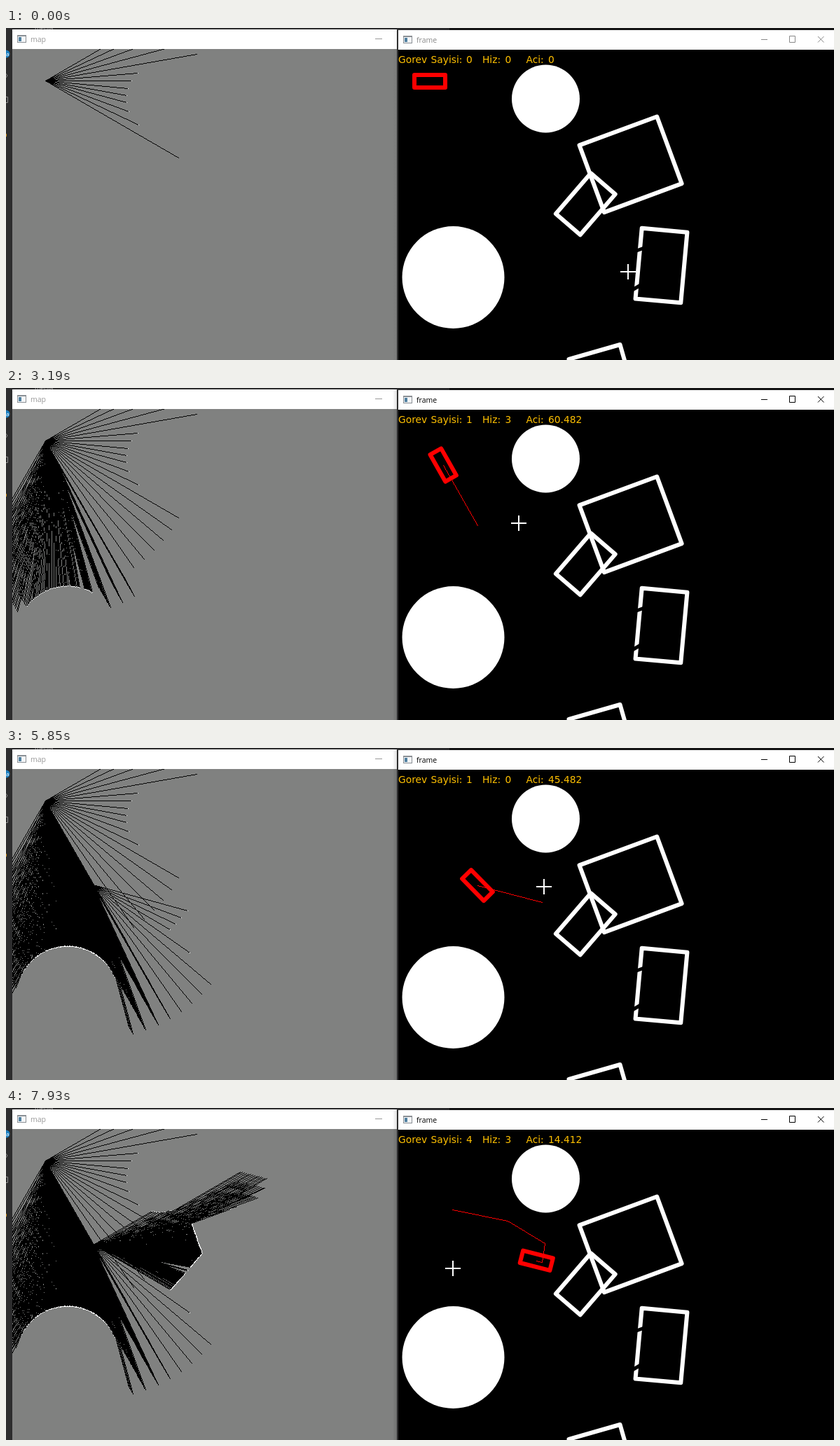
An HTML page with a canvas that plays this animation: 1182x474 px, repeating every 8000 ms.

```html
<!DOCTYPE html>
<html lang="en">
<head>
<meta charset="utf-8">
<title>Lidar mapping</title>
<style>
html, body { margin: 0; width: 100%; height: 100%; overflow: hidden; background: #2d2d2e; }
canvas { display: block; width: 1182px; height: 474px; }
</style>
</head>
<body>
<canvas id="stage" width="1182" height="474"></canvas>
<script>
const ctx = document.getElementById('stage').getContext('2d');
const LOOP = 8000, RANGE = 220, RAD = Math.PI / 180;
const MAP = { x: 9, y: 30, w: 549, h: 444 };
const VIEW = { x: 560, y: 31, w: 622, h: 443 };

// obstacles in the "frame" window
const circles = [[770.5, 101, 48.5], [638.5, 356, 73]];
const boxes = [
  box(891.6, 194.8, 118, 102, -20.3),
  box(827.3, 251.3, 46, 76.5, 40.8),
  box(935.5, 339.1, 65, 101, 5.2),
  box(850.5, 499, 76, 76, -16)
];
const walls = boxes.flatMap(b => b.map((p, i) => [...p, ...b[(i + 1) % 4]]));

// robot: turn to the first goal, drive, turn to the second, drive
const START = [605, 76], SENSOR = [1.6, 0.4];
const TURN = 3, SPEED = 3, HEAD_A = 60.482, HEAD_B = 14.412;
const TURNS_A = 21, MOVES_A = 46, TURNS_B = 16;
const STOP_A = TURNS_A + MOVES_A, GO_B = STOP_A + TURNS_B;
const REACHED_AT = 5200;

// clicks: time, x, y
const goals = [[930, 673, 196], [5420, 765, 220], [5950, 769, 193],
  [7080, 716, 161], [7785, 637, 145]];
const ACTIVE_AT = goals[0][0];

// time, simulation step
const stepKeys = [[1220, 0], [2640, 25.5], [3900, 45.3], [5130, STOP_A],
  [5590, STOP_A], [LOOP, GO_B + 30.6]];
// time, cursor x, cursor y
const cursorKeys = [...goals, [70, 888, 348], [680, 663, 167], [1710, 673, 196],
  [2640, 722, 204], [3900, 746, 179], [5010, 768, 198], [6620, 755, 177],
  [7920, 638, 229]].sort((a, b) => a[0] - b[0]);

function box(cx, cy, w, h, deg) {
  const c = Math.cos(deg * RAD), s = Math.sin(deg * RAD);
  return [[-1, -1], [1, -1], [1, 1], [-1, 1]].map(([i, j]) => {
    const u = i * w / 2, v = j * h / 2;
    return [cx + u * c - v * s, cy + u * s + v * c];
  });
}

function lerpKeys(keys, t) {
  const i = keys.findIndex(k => k[0] > t);
  if (i === 0) return keys[0].slice(1);
  if (i < 0) return keys[keys.length - 1].slice(1);
  const a = keys[i - 1], b = keys[i], f = (t - a[0]) / (b[0] - a[0]);
  return a.slice(1).map((v, j) => v + (b[j + 1] - v) * f);
}

function pose(step) {
  const a = Math.max(0, Math.min(MOVES_A, step - TURNS_A)) * SPEED;
  const b = Math.max(0, step - GO_B) * SPEED;
  const head = step <= STOP_A
    ? Math.min(step * TURN, HEAD_A)
    : Math.max(HEAD_A - (step - STOP_A) * TURN, HEAD_B);
  return {
    x: START[0] + a * Math.cos(HEAD_A * RAD) + b * Math.cos(HEAD_B * RAD),
    y: START[1] + a * Math.sin(HEAD_A * RAD) + b * Math.sin(HEAD_B * RAD),
    head
  };
}

// Bresenham line
function walk(x0, y0, x1, y1, plot) {
  [x0, y0, x1, y1] = [x0, y0, x1, y1].map(Math.round);
  const dx = Math.abs(x1 - x0), dy = -Math.abs(y1 - y0);
  const sx = x0 < x1 ? 1 : -1, sy = y0 < y1 ? 1 : -1;
  let err = dx + dy;
  for (;;) {
    plot(x0, y0);
    if (x0 === x1 && y0 === y1) return;
    const e = 2 * err;
    if (e >= dy) { err += dy; x0 += sx; }
    if (e <= dx) { err += dx; y0 += sy; }
  }
}

function solid(x, y) {
  return circles.some(([cx, cy, r]) => Math.hypot(x - cx, y - cy) <= r) ||
    walls.some(([x0, y0, x1, y1]) => {
      const dx = x1 - x0, dy = y1 - y0;
      const f = ((x - x0) * dx + (y - y0) * dy) / (dx * dx + dy * dy);
      const c = Math.max(0, Math.min(1, f));
      return Math.hypot(x - x0 - c * dx, y - y0 - c * dy) <= 3;
    });
}

// occupancy map, filled scan by scan
const image = ctx.createImageData(MAP.w, MAP.h);
const cells = new Uint32Array(image.data.buffer);
const GREY = 0xff808180, BLACK = 0xff000000, WHITE = 0xffffffff;
let scanned = -1;

function mark(x, y, colour) {
  if (x >= 0 && y >= 0 && x < MAP.w && y < MAP.h) cells[y * MAP.w + x] = colour;
}

function scan(step) {
  const p = pose(step);
  const x = p.x + SENSOR[0], y = p.y + SENSOR[1];
  const mid = p.head < 30 ? 0 : p.head < 60 ? 45 : 90;
  for (let a = mid - 30; a <= mid + 30; a += 5) {
    const c = Math.cos(a * RAD), s = Math.sin(a * RAD);
    let d = 0;
    while (d < RANGE && !solid(x + d * c, y + d * s)) d++;
    const ox = x - VIEW.x, oy = y - VIEW.y;
    const ex = ox + d * c, ey = oy + d * s;
    walk(ox, oy, ex, ey, (px, py) => mark(px, py, BLACK));
    if (d < RANGE) mark(Math.round(ex), Math.round(ey), WHITE);
  }
}

function updateMap(step) {
  if (step < scanned || scanned < 0) {
    cells.fill(GREY);
    scanned = -1;
  }
  while (scanned < step) scan(++scanned);
}

function rect(x, y, w, h, colour) {
  ctx.fillStyle = colour;
  ctx.fillRect(x, y, w, h);
}

function text(str, x, y, font, colour) {
  ctx.font = font;
  ctx.fillStyle = colour;
  ctx.fillText(str, x, y);
}

function stroke(points, colour, width, closed) {
  ctx.beginPath();
  points.forEach(p => ctx.lineTo(...p));
  if (closed) ctx.closePath();
  ctx.strokeStyle = colour;
  ctx.lineWidth = width;
  ctx.stroke();
}

function disc(x, y, r, colour) {
  ctx.beginPath();
  ctx.arc(x, y, r, 0, 2 * Math.PI);
  ctx.fillStyle = colour;
  ctx.fill();
}

function titleBar(view, name, colour) {
  const { x, w } = view, y = view.y - 28;
  rect(x, y, w, 28, '#fff');
  rect(x + 7, y + 8, 13, 11, '#8a8f94');
  rect(x + 8, y + 10, 11, 8, '#f4f6f8');
  rect(x + 9, y + 11, 4, 6, '#4f7f9f');
  text(name, x + 26, y + 18, '10.5px "Open Sans", sans-serif', colour);
}

function drawDesktop() {
  rect(0, 0, 1182, 474, '#2d2d2e');
  rect(633, 0, 549, 3, '#141414');
  text('media', 41, 3, '9px "Open Sans", sans-serif', '#b0b0b0');
  disc(0, 37, 5.5, '#1b7fc0');
  text('a', 0, 40, '8px "Open Sans", sans-serif', '#fff');
  stroke([[-1, 64], [2, 68], [-1, 72]], '#8a8a8a', 1);
  stroke(box(0, 102.5, 5, 8, 0), '#8a8a8a', 1, true);
  rect(0, 151, 1, 4, '#c98a1b');
}

function drawMapWindow() {
  titleBar(MAP, 'map', '#999');
  rect(527, 15, 10, 1, '#999');
  ctx.putImageData(image, MAP.x, MAP.y);
}

function drawWorld() {
  circles.forEach(c => disc(...c, '#fff'));
  boxes.forEach(b => stroke(b, '#fff', 6, true));
  // nicks in the left side of the upright box
  stroke([[900, 318], [911, 314]], '#000', 5);
  stroke([[894, 374], [906, 367]], '#000', 5);
}

function drawStatus(count, speed, head) {
  const put = (s, x) => text(s, x, 50, '13.8px "DejaVu Sans", sans-serif', '#ffc000');
  put('Gorev', 560);
  put('Sayisi:', 606.5);
  put(count, 657);
  put('Hiz:', 680);
  put(speed, 712.5);
  put('Aci:', 742.5);
  put(String(+head.toFixed(3)), 774);
}

function drawRobot(p, route) {
  stroke(box(p.x, p.y, 44, 18, p.head), '#f00', 6, true);
  let { x, y } = p;
  for (const [, gx, gy] of route) {
    walk(x, y, gx, gy, (px, py) => rect(px, py, 1, 1, '#f00'));
    [x, y] = [gx, gy];
  }
}

function drawButtons(colour) {
  rect(1078, 16, 9, 1, colour);
  stroke(box(1122.5, 16, 8, 9, 0), colour, 1, true);
  stroke([[1159, 12], [1167.5, 20.5]], colour, 1);
  stroke([[1167.5, 12], [1159, 20.5]], colour, 1);
}

function drawFrameWindow(t, step) {
  const active = t >= ACTIVE_AT, ink = active ? '#000' : '#888';
  const shade = ctx.createLinearGradient(552, 0, 559, 0);
  shade.addColorStop(0, 'rgba(0,0,0,0)');
  shade.addColorStop(1, `rgba(0,0,0,${active ? 0.15 : 0.06})`);
  rect(552, 2, 7, 472, shade);
  rect(559, 3, 1, 471, '#333');
  titleBar(VIEW, 'frame', ink);
  drawButtons(ink);
  rect(VIEW.x, VIEW.y, VIEW.w, VIEW.h, '#000');

  const p = pose(step), reached = t >= REACHED_AT;
  const route = goals.slice(reached ? 1 : 0).filter(g => t >= g[0]);
  const moving = (step > TURNS_A && !reached) || step > GO_B;
  ctx.save();
  ctx.beginPath();
  ctx.rect(VIEW.x, VIEW.y, VIEW.w, VIEW.h);
  ctx.clip();
  drawWorld();
  drawStatus(route.length, moving ? SPEED : 0, p.head);
  drawRobot(p, route);
  ctx.restore();
}

function drawCursor(t) {
  const [x, y] = lerpKeys(cursorKeys, t).map(Math.round);
  ctx.globalCompositeOperation = 'difference';
  rect(x - 11, y - 1, 22, 2, '#fff');
  rect(x - 1, y - 11, 2, 10, '#fff');
  rect(x - 1, y + 1, 2, 10, '#fff');
  ctx.globalCompositeOperation = 'source-over';
}

function draw(t) {
  const step = Math.floor(lerpKeys(stepKeys, t)[0]);
  updateMap(Math.max(0, step - 1)); // the map lags one step behind
  ctx.lineJoin = 'round';
  drawDesktop();
  drawMapWindow();
  drawFrameWindow(t, step);
  drawCursor(t);
}

const begin = performance.now();
function tick() {
  draw((performance.now() - begin) % LOOP);
  requestAnimationFrame(tick);
}
tick();
</script>
</body>
</html>
```
